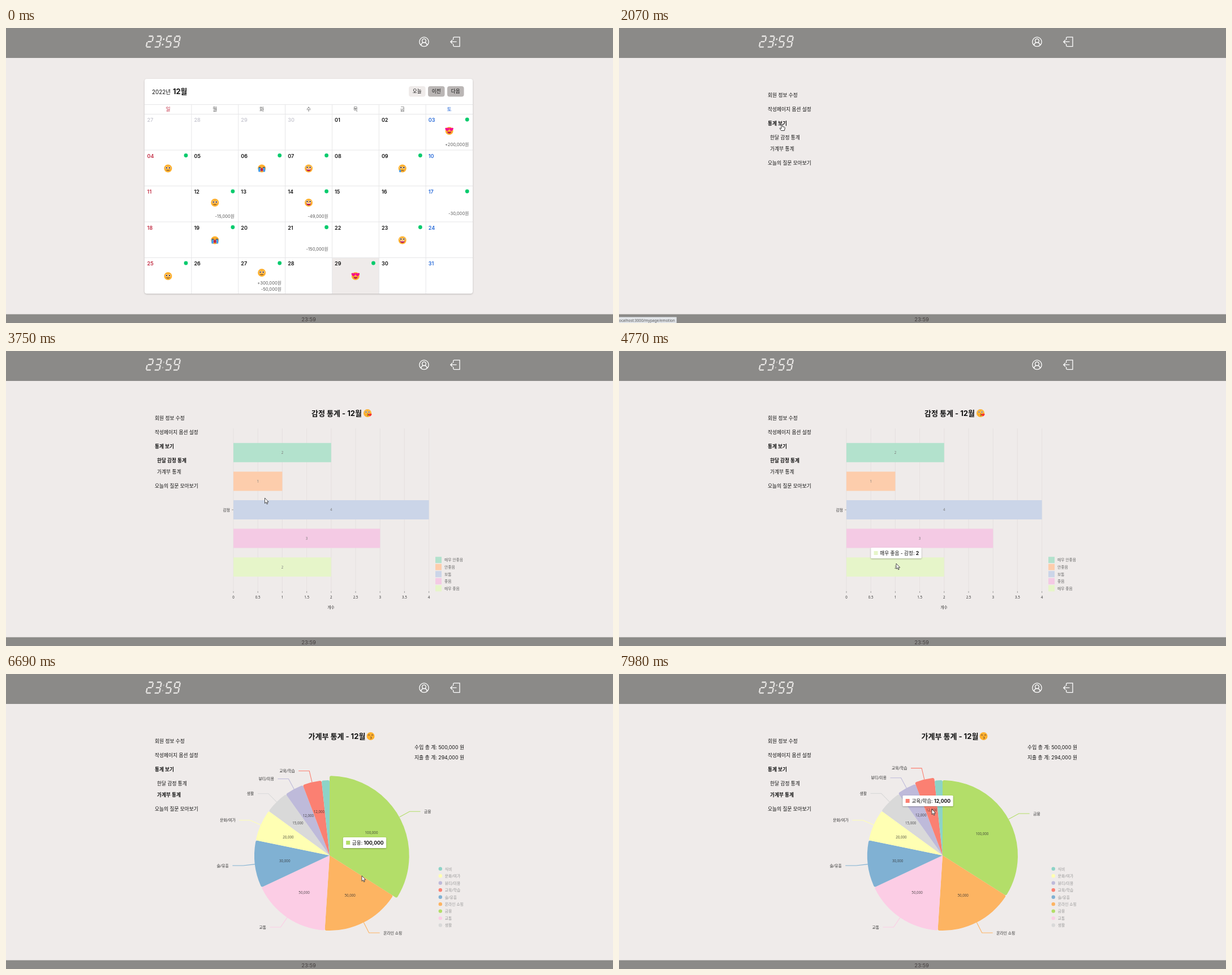
Animation of 1073 by 522 pixels, one loop 8000 ms. Source, as an HTML page with a canvas:

```html
<!DOCTYPE html>
<html lang="ko">
<head>
<meta charset="utf-8">
<title>Calendar and statistics</title>
<style>
html, body { margin: 0; width: 1073px; height: 522px; overflow: hidden; background: #efebea; }
canvas { display: block; }
</style>
</head>
<body>
<canvas id="stage" width="1073" height="522"></canvas>
<script>
const c = document.getElementById('stage').getContext('2d');
const UI = 'Inter, "Noto Sans CJK KR", "Noto Sans CJK", sans-serif';
const SMALL = '"Noto Sans", "Noto Sans CJK KR", "Noto Sans CJK", sans-serif';
const TAU = Math.PI * 2, LOOP = 8000;
const OPEN_PAGE = 1200, OPEN_MENU = 2040, OPEN_BARS = 2450, OPEN_PIE = 5230, FIRST_HOVER = 6080;

const clamp = v => Math.max(0, Math.min(1, v));
const ramp = (t, from, to) => clamp((t - from) / (to - from));
const easeOut = p => 1 - (1 - p) ** 3;

// ---------- drawing helpers ----------
function text(s, x, y, size, { color = '#111', weight = 400, align = 'left', font = UI } = {}) {
  c.font = `${weight} ${size}px ${font}`;
  c.fillStyle = color;
  c.textAlign = align;
  c.fillText(s, x, y + size * 0.36);
}
function rect(x, y, w, h, color, r = 0) {
  c.fillStyle = color;
  c.beginPath();
  c.roundRect(x, y, w, h, r);
  c.fill();
}
function dot(x, y, r, color) {
  c.fillStyle = color;
  c.beginPath();
  c.arc(x, y, r, 0, TAU);
  c.fill();
}
function line(points, color, width = 1) {
  c.strokeStyle = color;
  c.lineWidth = width;
  c.beginPath();
  points.forEach(([x, y]) => c.lineTo(x, y));
  c.stroke();
}
function shape(d, color, stroke, width = 1) {
  const p = new Path2D(d);
  if (color) { c.fillStyle = color; c.fill(p); }
  if (stroke) { c.strokeStyle = stroke; c.lineWidth = width; c.stroke(p); }
}
function shadow(color, blur, dy) {
  c.shadowColor = color;
  c.shadowBlur = blur;
  c.shadowOffsetY = dy;
}
function at(x, y, draw) {
  c.save();
  c.translate(x, y);
  draw();
  c.restore();
}

// ---------- faces ----------
const DARK = '#402a32';
const HEART = 'M0 2.6C-5 -.5 -2.6 -3.6 0 -1.6C2.6 -3.6 5 -.5 0 2.6Z';
const eyes = (y, r) => [-2.6, 2.6].forEach(x => {
  dot(x, y, r + 0.7, '#fff');
  dot(x, y, r, DARK);
});
const FACES = {
  smile() {
    eyes(-1, 1.3);
    shape('M-2.8 2.6Q0 5 2.8 2.6', null, DARK, 0.9);
  },
  grin() {
    eyes(-2, 1.3);
    shape('M-4.2 .8H4.2C4 6.5 -4 6.5 -4.2 .8Z', '#bb1d50');
    shape('M-3.6 .8H3.6L3.2 2H-3.2Z', '#fff');
  },
  love() {
    shape('M-3.6 1.6H3.6C3.4 6 -3.4 6 -3.6 1.6Z', '#bb1d50');
    [-3.6, 3.6].forEach(x => at(x, -2.6, () => { c.scale(1.25, 1.25); shape(HEART, '#f70a8d'); }));
  },
  sob() {
    [-6, 2.4].forEach(x => rect(x, -2, 3.6, 8, '#3f9cf0', 1));
    shape('M-5.2 -2.4Q-3.5 -1 -1.8 -2.4M1.8 -2.4Q3.5 -1 5.2 -2.4', null, DARK, 1.1);
    c.fillStyle = '#bb1d50';
    c.beginPath();
    c.ellipse(0, 2, 2.1, 3, 0, 0, TAU);
    c.fill();
  },
  tear() {
    eyes(-1.6, 1.3);
    shape('M-2.4 4.4Q0 2 2.4 4.4', null, DARK, 0.9);
    shape('M-4 1C-7 5.5 -5.5 6.8 -4 6.8S-1.6 5.5 -4 1Z', '#3f9cf0');
  },
  heartKiss() {
    eyes(-2, 1.1);
    shape('M0 1Q2.4 1.8 .6 2.9Q2.4 4 0 4.8', null, DARK, 0.9);
    at(4.6, 3, () => shape(HEART, '#f8312f'));
  },
  kiss() {
    shape('M-4.6 -1.6Q-3 -3.2 -1.4 -1.6M1.4 -1.6Q3 -3.2 4.6 -1.6', null, DARK, 1);
    shape('M0 1Q2.4 1.8 .6 2.9Q2.4 4 0 4.8', null, DARK, 0.9);
  }
};
function face(kind, x, y) {
  at(x, y, () => { dot(0, 0, 7, '#ffb02e'); FACES[kind](); });
}

// ---------- page frame ----------
const SEGMENTS = {
  a: [2.4, 14.5, 9.6, 14.5], b: [10.3, 15.4, 10.3, 23.2], c: [10.3, 25, 10.3, 32.7],
  d: [2, 33.6, 9.6, 33.6], e: [1.5, 25, 1.5, 32.7], f: [1.5, 15.4, 1.5, 23.2], g: [2.4, 24.1, 9.4, 24.1]
};
function clock(t) {
  const color = '#e9e7e5', phase = t % 970;
  c.save();
  c.transform(1, 0, -0.2, 1, 7, 0);
  [['abged', 246], ['abgcd', 260.5], ['afgcd', 279.5], ['abcdfg', 293.7]].forEach(([on, x]) => {
    for (const s of on) {
      const [x1, y1, x2, y2] = SEGMENTS[s];
      line([[x + x1, y1], [x + x2, y2]], color, 2.3);
    }
  });
  c.globalAlpha = 0.4 + 0.6 * Math.max(1 - ramp(phase, 180, 270), ramp(phase, 920, 970));
  rect(274.5, 18.5, 2.6, 2.8, color);
  rect(274.5, 28, 2.6, 2.8, color);
  c.restore();
}
function frame(t) {
  rect(0, 0, 1073, 522, '#efebea');
  rect(0, 0, 1073, 53, '#8b8a88');
  rect(0, 506.5, 1073, 15.5, '#8b8a88');
  text('23:59', 535, 516, 9.4, { color: '#453f3f', align: 'center' });
  clock(t);
  at(739, 24.4, () => {
    shape('M8.2 0A8.2 8.2 0 1 1 -8.2 0A8.2 8.2 0 1 1 8.2 0M3.4 -1.8A3.4 3.4 0 1 1 -3.4 -1.8A3.4 3.4 0 1 1 3.4 -1.8M-5.3 6Q-4.4 2.2 -1.8 1.3M5.3 6Q4.4 2.2 1.8 1.3', null, '#fff', 1.3);
  });
  shape('M790.6 21V18Q790.6 16.2 792.4 16.2H802V32.6H792.4Q790.6 32.6 790.6 30.8V28M796.5 24.4H785.8M789.2 21L785.8 24.4L789.2 27.8', null, '#fff', 1.3);
}

// ---------- calendar ----------
const COL = 82.86, ROW = 63.5, LEFT = 245, TOP = 152.5;
const MOODS = { 3: 'love', 4: 'smile', 6: 'sob', 7: 'grin', 9: 'tear', 12: 'smile', 14: 'grin', 19: 'sob', 23: 'grin', 25: 'smile', 27: 'smile', 29: 'love' };
const MONEY = { 3: ['+200,000'], 12: ['-15,000'], 14: ['-49,000'], 17: ['-30,000'], 21: ['-150,000'], 27: ['+300,000', '-50,000'] };
const RED = '#c0283f', BLUE = '#2468d8';

function calendar() {
  shadow('rgba(0,0,0,.22)', 3, 1);
  rect(LEFT, 90, 580, 380, '#fff', 4);
  shadow('transparent', 0, 0);
  text('2022년', 258, 113, 9.8);
  text('12월', 295, 112, 12.8, { weight: 700 });
  ['오늘', '이전', '다음'].forEach((s, i) => {
    const x = 712 + 34 * i;
    rect(x, 103, 29.5, 18.5, i ? '#bab6b5' : '#efebea', 4);
    text(s, x + 14.7, 112.2, 8.6, { align: 'center', weight: 500 });
  });
  rect(576.4, TOP + 4 * ROW, COL, ROW, '#efebea');
  const rule = '#e6e6e8';
  line([[LEFT, 135.5], [825, 135.5]], rule);
  for (let r = 0; r < 5; r++) line([[LEFT, TOP + r * ROW], [825, TOP + r * ROW]], rule);
  for (let i = 1; i < 7; i++) line([[LEFT + i * COL, 135.5], [LEFT + i * COL, 470]], rule);
  [...'일월화수목금토'].forEach((s, i) => text(s, LEFT + (i + 0.5) * COL, 144, 8.8,
    { align: 'center', color: i === 0 ? RED : i === 6 ? BLUE : '#555' }));

  for (let i = 0; i < 35; i++) {
    const day = i - 3, x = LEFT + (i % 7) * COL, y = TOP + Math.floor(i / 7) * ROW;
    const money = MONEY[day] || [], mood = MOODS[day];
    const color = day < 1 ? '#c9c9d2' : i % 7 === 0 ? RED : i % 7 === 6 ? BLUE : '#111';
    text(String(day < 1 ? day + 30 : day).padStart(2, '0'), x + 4.6, y + 10.7, 9, { color, weight: 600 });
    if (mood || money.length) dot(x + 73, y + 9.5, 3.4, '#05cb6d');
    if (mood) face(mood, x + COL / 2, y + [32.5, 29.5, 26.5][money.length]);
    const lowest = mood ? 53.5 : 48.7;
    money.forEach((s, k) => text(s + '원', x + 76, y + (money.length > 1 ? 45 + k * 11.2 : lowest), 7.6,
      { align: 'right', color: '#5a5a5a' }));
  }
}

// ---------- side menu ----------
function menu(t) {
  const item = (s, x, y, bold) => text(s, x, y, 8.7, { weight: bold ? 700 : 400 });
  const open = t >= OPEN_MENU;
  item('회원 정보 수정', 263, 118.7, !open);
  item('작성페이지 옵션 설정', 263, 143.7);
  item('통계 보기', 263, 168.7, open);
  if (open) {
    item('한달 감정 통계', 267, 193.7, t >= OPEN_BARS && t < OPEN_PIE);
    item('가계부 통계', 267, 213.8, t >= OPEN_PIE);
  }
  item('오늘의 질문 모아보기', 263, open ? 238.8 : 193.7);
}

// ---------- bar chart ----------
const BARS = [['매우 안좋음', 2, '#b3e2cd'], ['안좋음', 1, '#fdcdac'], ['보통', 4, '#cbd5e8'], ['좋음', 3, '#f4cae4'], ['매우 좋음', 2, '#e6f5c9']];
const X0 = 402, UNIT = 86.4;
const barTop = i => 162.8 + i * 50.6;
const label = (s, x, y, options) => text(s, x, y, 6.8, { font: SMALL, color: '#333', ...options });
const number = (s, x, y, color = '#333') => text(s, x, y, 6.2, { font: SMALL, color, align: 'center' });

function barChart(t) {
  text('감정 통계 - 12월', 540, 110, 13, { weight: 700 });
  face('heartKiss', 639, 110);
  for (let i = 0; i <= 8; i++) {
    const x = X0 + i * UNIT / 2;
    line([[x, 137], [x, 425]], '#e2dedd', 0.8);
    line([[x, 425], [x, 428]], '#777', 0.7);
    number(String(i / 2), x, 435.3);
  }
  const grow = easeOut(ramp(t, OPEN_BARS, OPEN_BARS + 350));
  BARS.forEach(([name, n, color], i) => {
    const w = n * UNIT * grow, y = barTop(i);
    rect(X0, y, w, 34, color);
    number(String(n), X0 + w / 2, y + 17.2, '#7a7a7a');
    rect(759, 364.2 + i * 12.55, 11, 11, color);
    label(name, 775, 370 + i * 12.55, { color: '#666' });
  });
  line([[399, 281], [402, 281]], '#777', 0.7);
  label('감정', 396, 281.5, { align: 'right' });
  label('개수', 574.5, 453.5, { align: 'center' });
}

// ---------- pie chart ----------
const PIE = [['금융', 100, '#b3de69'], ['온라인 쇼핑', 50, '#fdb462'], ['교통', 50, '#fccde5'], ['술/유흥', 30, '#80b1d3'], ['문화/여가', 20, '#ffffb3'], ['생활', 15, '#d9d9d9'], ['뷰티/미용', 12, '#bebada'], ['교육/학습', 12, '#fb8072'], ['식비', 5, '#8dd3c7']];
const LEGEND = [8, 4, 6, 7, 3, 1, 0, 2, 5];
const CX = 572, CY = 321, TOTAL = 294;
let sum = 0;
const SLICES = PIE.map(([name, n, color]) => {
  const a0 = sum / TOTAL * TAU;
  sum += n;
  return { name, n, color, a0, a1: sum / TOTAL * TAU };
});
const polar = (r, a) => [CX + r * Math.sin(a), CY - r * Math.cos(a)];

function wedge({ color, a0, a1 }, r) {
  const round = Math.min(3, r), turn = round / Math.max(r, 1), q = Math.PI / 2;
  c.fillStyle = color;
  c.beginPath();
  c.moveTo(CX, CY);
  c.lineTo(...polar(r - round, a0));
  c.quadraticCurveTo(...polar(r, a0), ...polar(r, a0 + turn));
  c.arc(CX, CY, r, a0 + turn - q, a1 - turn - q);
  c.quadraticCurveTo(...polar(r, a1), ...polar(r - round, a1));
  c.fill();
}
// How far a slice has popped out: hover time, decaying into the past.
function popped(i, t) {
  let total = 0, hit = 0;
  for (let s = 0; s < 700; s += 10) {
    const w = Math.exp(-s / 110);
    total += w;
    if (pieHover(t - s) === i) hit += w;
  }
  return hit / total;
}
function pieChart(t) {
  text('가계부 통계 - 12월', 534.5, 110, 13, { weight: 700 });
  face('kiss', 644.5, 110);
  text('수입 총 계: 500,000 원', 810, 130.3, 8.8, { align: 'right' });
  text('지출 총 계: 294,000 원', 810, 148.3, 8.8, { align: 'right' });
  const base = 140 * easeOut(ramp(t, OPEN_PIE, OPEN_PIE + 190)) - 7 * easeOut(ramp(t, FIRST_HOVER, FIRST_HOVER + 300));
  const out = SLICES.map((s, i) => 8 * popped(i, t));
  SLICES.forEach((s, i) => wedge(s, base + out[i]));
  SLICES.forEach((s, i) => {
    if (s.n < 10) return;
    const r = base + out[i], a = (s.a0 + s.a1) / 2, side = a < Math.PI ? 1 : -1;
    const [x, y] = polar(153.7 + out[i], a);
    line([polar(r, a), [x, y], [x + side * 19, y]], s.color, 1.1);
    label(s.name, x + side * 25.5, y + 0.3, { align: side > 0 ? 'left' : 'right' });
    number(s.n + ',000', ...polar(r * 0.6, a), 'rgba(45,45,45,.8)');
  });
  LEGEND.forEach((k, i) => {
    dot(767.8, 344.8 + i * 12.47, 3.2, SLICES[k].color);
    label(SLICES[k].name, 775.8, 345.2 + i * 12.47, { color: '#999' });
  });
}

// ---------- pointer ----------
const PATH = [
  [180, 1056, 505], [270, 1003, 430], [420, 1003, 430], [1000, 738, 27], [1500, 738, 27], [1950, 288, 170],
  [2220, 288, 170], [2350, 300, 193], [2650, 305, 193], [2910, 393, 181], [3150, 440, 182], [3450, 435, 230],
  [3810, 462, 266], [3950, 478, 275], [4250, 485, 335], [4550, 490, 376], [4770, 490, 376], [5130, 297, 216],
  [5850, 297, 216], [6150, 470, 300], [6400, 610, 285], [6560, 636, 300], [6630, 634, 317], [6690, 629, 357],
  [6850, 610, 400], [7150, 596, 410], [7350, 530, 390], [7500, 490, 330], [7620, 500, 285], [7720, 520, 262],
  [7800, 538, 248], [7920, 546, 243], [7980, 553, 239], [8000, 553, 239]
];
function pointer(t) {
  const i = Math.max(1, PATH.findIndex(p => p[0] >= t));
  const [t0, x0, y0] = PATH[i - 1], [t1, x1, y1] = PATH[i], k = ramp(t, t0, t1);
  return [x0 + (x1 - x0) * k, y0 + (y1 - y0) * k];
}
function barHover(t) {
  if (t < OPEN_BARS || t >= OPEN_PIE) return -1;
  const [x, y] = pointer(t);
  return BARS.findIndex(([, n], i) => x > X0 && x < X0 + n * UNIT && y > barTop(i) && y < barTop(i) + 34);
}
function pieHover(t) {
  if (t < OPEN_PIE) return -1;
  const [x, y] = pointer(t), dx = x - CX, dy = CY - y;
  if (Math.hypot(dx, dy) > 138) return -1;
  const a = (Math.atan2(dx, dy) + TAU) % TAU;
  // The first slice stays active a little past its edge.
  return SLICES.findIndex((s, i) => a < s.a1 + (i ? 0 : 0.06));
}
function tooltip(t) {
  const b = barHover(t), p = pieHover(t);
  if (b < 0 && p < 0) return;
  const [name, value, color] = b >= 0
    ? [BARS[b][0] + ' - 감정: ', String(BARS[b][1]), BARS[b][2]]
    : [PIE[p][0] + ': ', PIE[p][1] + ',000', PIE[p][2]];
  const size = 8.6, [x, y] = pointer(t - 60);
  c.font = `400 ${size}px ${UI}`;
  const w1 = c.measureText(name).width;
  c.font = `700 ${size}px ${UI}`;
  const w = w1 + c.measureText(value).width + 20.5, left = x - w / 2, mid = y - 18.5;
  shadow('rgba(0,0,0,.3)', 2.5, 1);
  rect(left, mid - 9.5, w, 19, '#fff', 1.5);
  shadow('transparent', 0, 0);
  rect(left + 5.3, mid - 3.5, 7, 7, color);
  text(name, left + 16, mid, size);
  text(value, left + 16 + w1, mid, size, { weight: 700 });
}
const within = (t, spans) => spans.some(([a, b]) => t >= a && t < b);

function cursor(t) {
  if (t < 180) return;
  const [x, y] = pointer(t);
  if (within(t, [[1120, 1215], [2400, 2490], [5190, 5270]])) dot(x + 0.5, y - 2.2, 8, 'rgba(224,216,62,.8)');
  at(x, y, () => within(t, [[960, 1540], [1900, 2720], [5090, 5890]])
    ? shape('M-1 1Q0 -.6 1 1V4.6L4.5 5.3Q5.4 5.6 5.3 7L4.4 11.5H-1.2L-4 7.6Q-3.6 6.2 -1 8Z', '#fff', '#222', 0.9)
    : shape('M0 0V9.6L2.2 7.6L3.7 11L5.2 10.3L3.7 7.1H6.7Z', '#fff', '#222', 0.8));
}
function status(t) {
  const [, , page, width] = [[1000, 1560, 'user', 89], [1900, 3050, 'emotion', 102], [5090, 6050, 'account', 357]]
    .find(([a, b]) => t >= a && t < b) || [];
  if (!page) return;
  rect(-2, 511.2, width + 2, 12, '#c4c7ca', 1);
  rect(-2, 511.9, width + 1.3, 12, '#e1e4e8', 1);
  text('localhost:3000/mypage/' + page, -1.8, 517.2, 6.6, { font: SMALL, color: '#555' });
}

function draw(now) {
  const t = now % LOOP;
  frame(t);
  if (t < OPEN_PAGE) calendar();
  else {
    menu(t);
    if (t >= OPEN_PIE) pieChart(t);
    else if (t >= OPEN_BARS) barChart(t);
  }
  tooltip(t);
  status(t);
  cursor(t);
}
let start;
function tick(now) {
  start ??= now;
  draw(now - start);
  requestAnimationFrame(tick);
}
requestAnimationFrame(tick);
</script>
</body>
</html>
```
